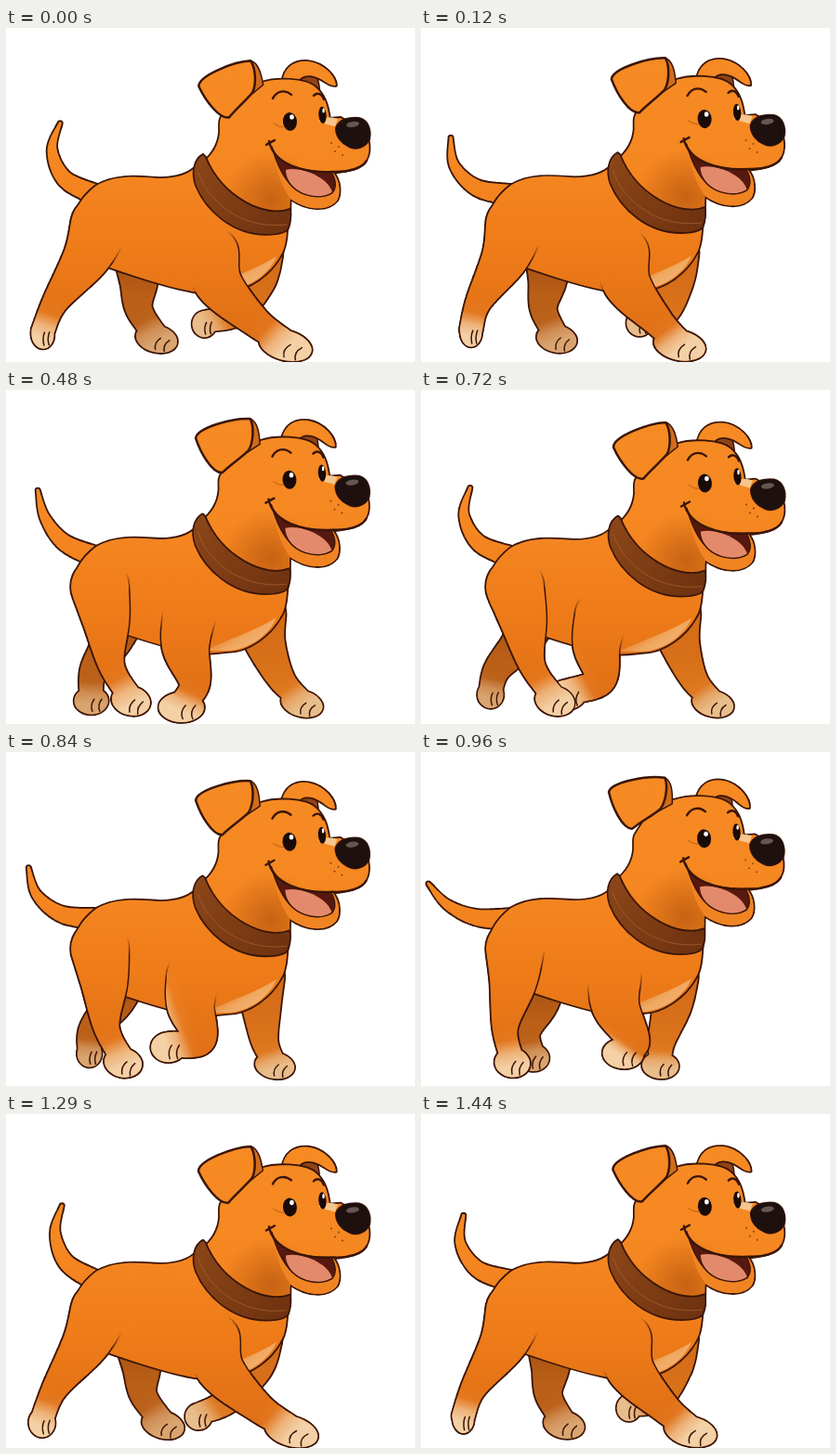
An HTML page with a canvas that plays this animation: 440x360 px, repeating every 1.47 s.

```html
<!DOCTYPE html>
<html lang="en">
<head>
<meta charset="utf-8">
<title>Walking dog</title>
<style>
  html, body { margin: 0; width: 100%; height: 100%; overflow: hidden; background: #fff; }
  canvas { display: block; width: 440px; height: 360px; }
</style>
</head>
<body>
<canvas id="stage" width="440" height="360"></canvas>
<script>
const ctx = document.getElementById('stage').getContext('2d');
const LOOP = 1470, STEP = 30, GAIT = 1375;
const { PI, cos, sin, hypot, max, min, floor } = Math;
const INK = '#3a1508';

// Joints: x, y at mid-stride, share of the paw's travel, forward bend when lifted
const legs = {
  nearHind: {
    phase: .23, skew: 0, stride: 55, lift: 7, radii: [31, 25, 13.5, 12],
    hip: [101, 212], follow: 0, knee: [98, 247, .23, 2], shin: [87, 297, .64, 0],
    paw: [93, 335], size: [18.5, 15.5]
  },
  nearFront: {
    phase: PI + .17, skew: .25, stride: 75, lift: 24, radii: [28, 25, 16, 13],
    hip: [206, 243], follow: .7, knee: [207, 276, .32, 10], shin: [228, 316, .58, 14],
    paw: [232, 342], size: [26, 16]
  },
  farHind: {
    phase: PI + .3, skew: .3, stride: 48, lift: 10, radii: [24, 20, 14, 12],
    hip: [137, 245], follow: .5, knee: [126, 272, .42, 3], shin: [115, 303, .7, 0],
    paw: [122, 335], size: [20, 14.5]
  },
  farFront: {
    phase: .47, skew: 0, stride: 59, lift: 21, radii: [28, 21, 14, 11],
    hip: [270, 242], follow: .3, knee: [271, 273, .15, 6], shin: [264, 312, .62, 18],
    paw: [266, 338], size: [20, 14]
  }
};

const shape = d => new Path2D(d);
const body = shape('M97 170C120 157 145 161 165 162C185 162 198 157 206 148L304 190C302 215 303 235 295 246C285 264 262 283 238 283C222 285 205 286 196 283C170 278 140 268 108 257C85 250 72 235 72 215C72 195 84 180 97 170Z');
const bib = shape('M214 282C232 272 266 262 291 246C284 264 262 281 238 282Z');
const head = shape('M211 146C222 137 229 126 230 112C230 104 229 99 233 94C245 75 255 62 275 59C290 54 322 54 333 64C342 72 346 82 348 98L360 97L388 115C393 130 392 147 374 152C368 154 360 155 352 156C360 165 360 180 356 186C346 198 324 197 306 184C305 190 306 198 305 207C285 215 220 190 211 154Z');
const jaw = shape('M286 128C292 148 322 156 352 156C360 165 360 180 356 186C346 198 324 197 306 184C296 170 289 150 286 128Z');
const mouth = shape('M286 128C292 148 322 156 350 155C355 164 356 172 351 178C338 186 318 181 308 171C298 161 291 146 286 128Z');
const tongue = shape('M301 153C318 149 346 161 351 177C338 186 318 181 308 170C303 164 301 158 301 153Z');
const smile = shape('M283 122C288 147 320 157 352 155C368 156 384 151 388 143M280 126L289 121');
const brows = shape('M287 76C291 68 300 66 307 72M331 73C335 69 340 71 342 77');
const nose = shape('M355 108C358 98 370 96 380 97C390 99 393 111 391 120C387 129 376 132 369 128C362 125 355 118 355 108Z');
const blaze = shape('M336 100Q345 94 357 98Q355 103 354 106Q344 104 336 100Z');
const collar = shape('M212 137C203 142 200 156 205 170C216 197 245 222 280 222C292 222 300 220 303 216C306 208 306 202 305 196C280 206 232 184 214 139Z');
const stitch = shape('M207 156C216 184 250 218 302 212');
const earFlap = shape('M208 63C208 52 245 37 263 36C268 44 269 60 265 69C258 78 248 86 240 96C230 98 215 78 208 63Z');
const earBack = shape('M263 36C271 38 274 50 276 61L258 76Z');
const farEar = shape('M297 60C299 42 310 35 325 36C342 38 355 52 355 62C347 63 343 56 334 53C326 50 316 50 312 62Z');
const farInner = shape('M306 62C310 50 318 45 326 47C334 49 336 56 337 70Z');

// Rounded tube along a spline: points are [x, y, radius]
function tube(points) {
  const path = new Path2D(), last = points.length - 1, fine = 16;
  for (let s = 0; s <= last * fine; s++) {
    const i = min(last - 1, floor(s / fine)), u = s / fine - i;
    const [a, b, c, d] = [i - 1, i, i + 1, i + 2].map(k => points[max(0, min(last, k))]);
    const [x, y, r] = b.map((p, j) => p + .5 * u * (c[j] - a[j] +
      u * (2 * a[j] - 5 * p + 4 * c[j] - d[j] + u * (3 * (p - c[j]) + d[j] - a[j]))));
    path.moveTo(x + r, y);
    path.arc(x, y, max(.5, r), 0, 7);
  }
  return path;
}

function fade(x0, y0, x1, y1, ...stops) {
  const g = ctx.createLinearGradient(x0, y0, x1, y1);
  stops.forEach((c, i) => g.addColorStop(i / (stops.length - 1), c));
  return g;
}

const coat = fade(0, 30, 0, 350, '#f68a23', '#f68822', '#ee7b18', '#dc6d16');
const frontShade = fade(0, 235, 0, 350, '#d06817', '#e27a1e');
const hindShade = fade(0, 240, 0, 345, '#a34e10', '#bb6018', '#b85c17');
const leather = fade(205, 150, 300, 220, '#8a4518', '#7d3c14', '#6e3210');

function fill(path, color) {
  ctx.fillStyle = color;
  ctx.fill(path);
}

function line(path, width, color = INK) {
  ctx.strokeStyle = color;
  ctx.lineWidth = width;
  ctx.stroke(path);
}

function inked(path, color, width = 3.6) {
  line(path, width);
  fill(path, color);
}

function dot(x, y, rx, ry, color, angle = 0) {
  ctx.beginPath();
  ctx.ellipse(x, y, rx, ry, angle, 0, 7);
  ctx.fillStyle = color;
  ctx.fill();
}

function shifted(dx, dy, paint) {
  ctx.save();
  ctx.translate(dx, dy);
  paint();
  ctx.restore();
}

function turned(x, y, angle, paint) {
  ctx.save();
  ctx.translate(x, y);
  ctx.rotate(angle);
  ctx.translate(-x, -y);
  paint();
  ctx.restore();
}

// Phase 0 puts the paw furthest back; it lifts soon after
function poseLeg(leg, theta) {
  const turn = theta + leg.phase;
  const phase = turn - leg.skew * cos(turn);
  const swing = -cos(phase), lift = max(0, cos(phase - .8)) ** 2;
  const travel = leg.stride * swing;
  const joint = ([x, y, share, bend]) => [x + share * travel + bend * lift, y - .4 * leg.lift * lift * share];

  const [kx, ky] = joint(leg.knee), [sx, sy] = joint(leg.shin);
  const px = leg.paw[0] + travel, py = leg.paw[1] - leg.lift * lift;
  const x = leg.hip[0] + (kx - leg.hip[0]) * leg.follow, y = leg.hip[1];
  const w = leg.size[0] + 3 * swing - 5 * lift, h = leg.size[1];
  const angle = .1 + .17 * swing, r = leg.radii;

  const path = tube([[x, y, r[0]], [kx, ky, r[1]], [sx, sy, r[2]], [px, py - 3, r[3]]]);
  path.moveTo(px, py);
  path.ellipse(px, py, w, h, angle, 0, 7);
  return { path, x, y, sx, sy, px, py, angle, w, h };
}

function paintLeg(p, color, sock) {
  const { px, py, w, h } = p;
  fill(p.path, color);
  fill(p.path, fade(p.sx, p.sy, px, py + 4, sock + '00', sock + '10', sock + 'b0', sock));
  const toes = new Path2D();
  for (const k of [.08, .52]) {
    toes.moveTo(px + w * (k + .1), py - h * .12);
    toes.quadraticCurveTo(px + w * (k - .16), py + h * .3, px + w * (k - .02), py + h * .78);
  }
  turned(px, py, p.angle, () => line(toes, 1.5));
}

// Leg edge that melts into the body near its root
function crease(p) {
  const dx = 2 * (p.px - p.x), dy = p.py - p.y, len = hypot(dx, dy) / 20;
  line(p.path, 3, fade(p.x, p.y, p.x + dx / len, p.y + dy / len, INK + '00', INK));
}

// A wave runs along the tail, wider and later toward the tip
function paintTail(theta) {
  let x = 97, y = 180;
  const points = [[x, y, 11]];
  for (let i = 0; i < 3; i++) {
    const angle = 2.84 - .52 * i + (.26 + .14 * i) * cos(2 * theta - 2.3 - .28 * i);
    const len = 38 - 4 * i;
    x += len * cos(angle);
    y -= len * sin(angle);
    points.push([x, y, 8.5 - 3.4 * i]);
  }
  inked(tube(points), coat);
}

function paintEye(x, y, size) {
  dot(x, y, 7.5 * size, 8 + 2 * size, '#1a0b08', -.08);
  dot(x + 2 * size, y - 5, 2.3 * size, 2.7, '#fff');
}

function paintHead(bob) {
  turned(303, 56, .12 * bob, () => {
    inked(farInner, '#8f4315', 3);
    inked(farEar, coat);
  });
  inked(head, coat);

  ctx.save();
  ctx.clip(head);
  const dusk = ctx.createRadialGradient(285, 185, 2, 285, 185, 52);
  dusk.addColorStop(0, '#a84c0c90');
  dusk.addColorStop(1, '#a84c0c00');
  ctx.fillStyle = dusk;
  ctx.fillRect(225, 130, 90, 80);
  ctx.restore();

  fill(jaw, '#f18422');
  fill(mouth, '#57190f');
  fill(tongue, '#e48a6c');
  line(mouth, 1.4);
  line(smile, 2.4);
  line(brows, 2.4);
  fill(blaze, '#f8c68c');
  inked(nose, '#1d100e', 2);
  dot(373, 104, 7, 3, '#665652', -.15);
  paintEye(305.5, 101, 1);
  paintEye(340.5, 94, .55);
  for (let i = 0; i < 4; i++) dot(350 + 4 * i, 124 + 7 * (i % 2) + 2 * i, .9, .9, '#7c350c');
  line(shape('M288 103Q293 107 299 107'), .9, '#b5570f');

  turned(263, 36, .22 * bob, () => {
    inked(earBack, '#d06c1b', 3);
    inked(earFlap, coat);
    line(earFlap, 1.4);
  });
}

function draw(time) {
  const theta = 2 * PI * time / GAIT;
  const bob = .5 + .5 * cos(2 * theta - 2.9);
  const { nearHind, nearFront, farHind, farFront } = Object.fromEntries(
    Object.entries(legs).map(([name, leg]) => [name, poseLeg(leg, theta)]));

  ctx.fillStyle = '#fff';
  ctx.fillRect(0, 0, 440, 360);
  ctx.lineJoin = ctx.lineCap = 'round';

  line(farHind.path, 3.6);
  paintLeg(farHind, hindShade, '#d9a470');
  line(farFront.path, 3.6);
  paintLeg(farFront, frontShade, '#e8bd8c');
  paintTail(theta);

  // One outline around body and near legs, then the fills
  const near = [nearFront, nearHind];
  shifted(0, -2 * bob, () => line(body, 3.6));
  for (const leg of near) line(leg.path, 3.6);
  shifted(0, -2 * bob, () => {
    fill(body, coat);
    fill(bib, fade(245, 255, 262, 284, '#f3c48c00', '#f3c48ca0', '#f3c48cd0'));
  });
  for (const leg of near) {
    crease(leg);
    paintLeg(leg, coat, '#f3d0a5');
  }

  shifted(-bob, -8 * bob, () => paintHead(bob));
  shifted(-bob, -5 * bob, () => {
    inked(collar, leather);
    line(stitch, .8, '#a4602c');
  });
}

function tick() {
  draw(floor(performance.now() % LOOP / STEP) * STEP);
  requestAnimationFrame(tick);
}
tick();
</script>
</body>
</html>
```
